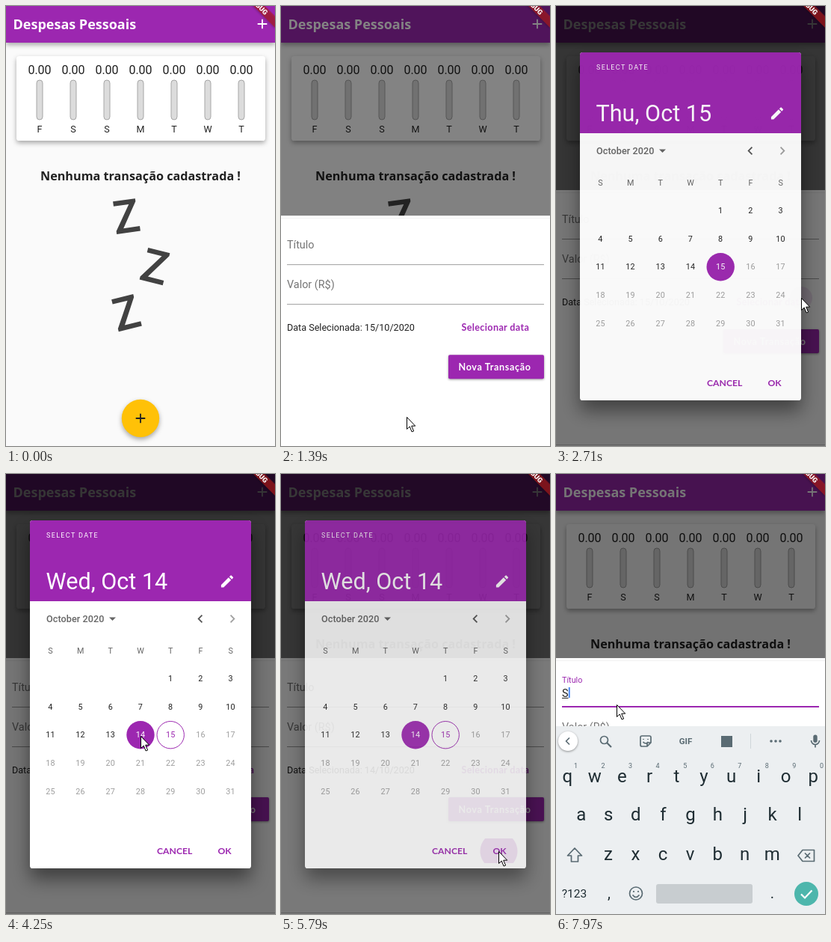
An HTML page for the animation above (8000 ms loop, 360 px wide and 588 px high).

```html
<!DOCTYPE html>
<html lang="pt">
<head>
<meta charset="utf-8">
<title>Despesas Pessoais</title>
<style>
  html, body { margin: 0; width: 100%; height: 100%; overflow: hidden; background: #fafafa; }
  svg { display: block; }
  #stage { width: 100vw; height: 100vh; }
  text { font-family: Roboto, sans-serif; white-space: pre; }
  .title { font-family: "Open Sans", sans-serif; font-weight: 700; }
  .button { font-family: Lato, sans-serif; font-weight: 700; }
  .medium { font-weight: 500; }
  .bold { font-weight: 700; }
  .line { fill: none; stroke: #5a6b73; stroke-width: 1.7; stroke-linejoin: round; }
  .low { filter: drop-shadow(0 1px 1.5px #0006); }
  .mid { filter: drop-shadow(0 3px 3px #0005); }
  .high { filter: drop-shadow(0 14px 12px #0007); }
</style>
</head>
<body>
<svg id="stage" viewBox="0 0 360 588"></svg>
<script>
const LOOP = 8000, PURPLE = '#9c27b0', INK = '#212121', GREY = '#757575';
const stage = document.getElementById('stage');
const $ = id => document.getElementById(id);

const text = (x, y, size, fill, str, attrs = '') =>
  `<text x="${x}" y="${y}" font-size="${size}" fill="${fill}" ${attrs}>${str}</text>`;
const centred = (x, y, size, fill, str, attrs = '') =>
  text(x, y, size, fill, str, `text-anchor="middle" ${attrs}`);
const rect = (x, y, w, h, fill, attrs = '') =>
  `<rect x="${x}" y="${y}" width="${w}" height="${h}" fill="${fill}" ${attrs}/>`;
const circle = (x, y, r, fill, attrs = '') =>
  `<circle cx="${x}" cy="${y}" r="${r}" fill="${fill}" ${attrs}/>`;
const path = (d, attrs = '') => `<path d="${d}" ${attrs}/>`;
const icon = (x, y, d, fill) =>
  path(d, `fill="${fill}" transform="translate(${x} ${y}) scale(.9) translate(-12 -12)"`);
const splash = (id, x, y, fill = PURPLE) => circle(x, y, 0, fill, `id="${id}" opacity=".13"`);

const PLUS = 'M19 13h-6v6h-2v-6H5v-2h6V5h2v6h6v2z';
const PENCIL = 'M3 17.25V21h3.75L17.81 9.94l-3.75-3.75L3 17.25zM20.71 7.04a1 1 0 0 0 0-1.41l-2.34-2.34a1 1 0 0 0-1.41 0l-1.83 1.83 3.75 3.75 1.83-1.83z';
const LEFT = 'M15.41 7.41 14 6l-6 6 6 6 1.41-1.41L10.83 12z';
const RIGHT = 'M10 6 8.59 7.41 13.17 12l-4.58 4.59L10 18l6-6z';
const LETTER_Z = 'M-15-22H15V-18L-6 15.5H16V22H-16V18L5.5-15.5H-15z';

function home() {
  const days = [...'FSSMTWT'].map((day, i) => {
    const x = 45 * (i + 1);
    return centred(x, 91, 16, INK, '0.00')
      + rect(x - 4, 99, 8, 53, '#dcdcdc', 'rx="4" stroke="#a6a6a6"')
      + centred(x, 169, 12.6, INK, day);
  }).join('');
  const sleep = [[161, 281, -8], [199.5, 348, 14], [161, 410, -14]].map(([x, y, turn]) =>
    path(LETTER_Z, `fill="#424242" transform="translate(${x} ${y}) rotate(${turn})"`)).join('');
  return rect(0, 0, 360, 588, '#fafafa')
    + rect(0, -5, 360, 54, PURPLE, 'class="mid"')
    + text(9.5, 31, 18, '#fff', 'Despesas Pessoais', 'class="title"')
    + icon(343, 24, PLUS, '#fff')
    + rect(14, 67, 333, 113, '#fff', 'rx="3.6" class="mid"')
    + days
    + centred(180, 233, 16.2, INK, 'Nenhuma transação cadastrada !', 'class="title"')
    + sleep
    + circle(180, 551, 25.2, '#ffc107', 'class="mid"')
    + splash('fabSplash', 168, 549, '#000')
    + icon(180, 551, PLUS, INK);
}

function sheet() {
  return rect(0, 246, 360, 342, '#fff')
    + rect(0, 249, 360, 1, '#f1f1f1') + rect(0, 586, 360, 1, '#cfcfcf')
    + text(8, 290, 14.4, GREY, 'Título', 'id="label"')
    + rect(8, 311, 344, 1, '#9e9e9e', 'id="underline"')
    + `<g id="typed">${text(8, 297.5, 14.4, INK, 'S')}${rect(8, 299, 8.5, 1, INK)}</g>`
    + rect(8.3, 285, 1.9, 14, '#4285f4', 'id="caret"')
    + text(8, 343, 14.4, GREY, 'Valor (R$)')
    + rect(8, 364, 344, 1, '#9e9e9e')
    + text(8, 400, 12.6, INK, '', 'id="date"')
    + splash('selectSplash', 328, 390)
    + text(241.5, 400, 12.6, PURPLE, 'Selecionar data', 'class="button" letter-spacing=".35"')
    + rect(224, 432, 128, 32, PURPLE, 'rx="2" class="low"')
    + text(237.5, 453, 12.6, '#fff', 'Nova Transação', 'class="button" letter-spacing=".65"');
}

function dialog() {
  const colX = i => 59.4 + 40.2 * i, rowY = i => 273 + 37.7 * i;
  let grid = [...'SMTWTFS'].map((day, i) => centred(colX(i), 240, 10.8, '#666', day)).join('');
  for (let day = 1; day <= 31; day++) {
    const cell = day + 3;
    grid += centred(colX(cell % 7).toFixed(1), (rowY(Math.floor(cell / 7)) + 4).toFixed(1), 10.8,
      day > 15 ? '#9e9e9e' : INK, day, `id="day${day}" letter-spacing=".2"`);
  }
  return rect(32, 62, 296, 465, '#fff', 'rx="3.6" class="high"')
    + path('M32 170V65.6a3.6 3.6 0 0 1 3.6-3.6H324.4a3.6 3.6 0 0 1 3.6 3.6V170z', `fill="${PURPLE}"`)
    + text(54, 85, 9, '#fff', 'SELECT DATE', 'letter-spacing="1.35"')
    + text(53.5, 154, 30.6, '#fff', '', 'id="headline"')
    + icon(296, 143.5, PENCIL, '#fff')
    + text(54, 198, 12.6, '#666', 'October 2020', 'class="medium" letter-spacing=".09"')
    + path('M138 191.5h9l-4.5 4.5z', 'fill="#666"')
    + icon(260, 193.5, LEFT, '#555') + icon(303, 193.5, RIGHT, '#a0a0a0')
    + circle(0, 348.7, 18.7, PURPLE, 'id="selected"')
    + circle(220.2, 348.7, 18.2, 'none', `id="today" stroke="${PURPLE}"`)
    + grid + splash('daySplash', 180, 350)
    + `<svg x="264" y="487" width="56" height="33">${splash('okSplash', 27.5, 17)}</svg>`
    + text(202, 508, 12.2, PURPLE, 'CANCEL', 'class="button"')
    + text(283.5, 508, 12.2, PURPLE, 'OK', 'class="button"');
}

function keyboard() {
  const step = 36.55, ink = '#1f2d33', soft = '#5a6b73';
  const row = (keys, x, y) => [...keys].map((key, i) => centred(x + step * i, y, 24, ink, key)).join('');
  const hints = [...'1234567890'].map((n, i) => centred(26.5 + step * i, 393, 9, soft, n)).join('');
  const line = (d, attrs = '') => path(d, `class="line" ${attrs}`);
  return rect(0, 337, 360, 251, '#eceff1')
    + circle(16, 357, 13, '#fff', 'class="low"') + line('M18 352.5l-4.5 4.5 4.5 4.5')
    + circle(64.5, 355.5, 5, 'none', 'class="line"') + line('M68 359l6 6', 'style="stroke-width:2.2"')
    + line('M115 350h10a2 2 0 0 1 2 2v7l-5 5h-7a2 2 0 0 1-2-2v-10a2 2 0 0 1 2-2zM127 359h-5v5M116.5 358q3.5 4 7 0M117 354v1M123 354v1')
    + centred(173.5, 361, 11.5, soft, 'GIF', 'class="bold"')
    + rect(221, 350, 15, 15, soft) + rect(260, 347, 1, 20, '#cfd6d9')
    + [288, 294, 300].map(x => circle(x, 357, 1.8, soft)).join('')
    + rect(344.3, 348.5, 5.4, 10.5, soft, 'rx="2.7"') + line('M341.5 356a5.5 5.5 0 0 0 11 0M347 361.5v4')
    + hints
    + row('qwertyuiop', 15.3, 412) + row('asdfghjkl', 33.7, 463) + row('zxcvbnm', 70, 516)
    + line('M25 500l-9.5 10h5v8h9v-8h5z')
    + line('M330 502.500h15.500v15h-15.500l-6-7.500zM333 506.500l7 7M340 506.500l-7 7')
    + centred(24.500, 566, 15.500, ink, '?123') + centred(71, 567, 20, ink, ',') + centred(289.500, 567, 20, ink, '.')
    + circle(107, 560.500, 8.500, 'none', 'class="line"') + line('M102.500 562.500q4.500 6 9 0M104 557v2M110 557v2')
    + rect(134, 548, 129, 26, '#c8cdd0', 'rx="3"')
    + circle(335, 561, 16, '#4db6ac') + path('M328 561.500l5 5 9.500-10', 'fill="none" stroke="#fff" stroke-width="2.2"');
}

stage.innerHTML = home()
  + rect(0, 0, 360, 588, '#000', 'id="sheetShade"')
  + `<g id="sheet">${sheet()}</g><g id="keyboard">${keyboard()}</g>`
  + rect(0, 0, 360, 588, '#000', 'id="dialogShade"')
  + `<g id="dialog">${dialog()}</g>`
  + `<g transform="translate(360 -22) rotate(45)">${rect(-36, 25.2, 72, 10.8, '#b71c1c', 'fill-opacity=".63" class="low"')}`
  + centred(0, 33.900, 9.200, '#fff', 'DEBUG', 'style="font-weight:900"') + '</g>'
  + path('M.5.5v16l3.700-3.500 2.900 7 2.500-1-2.900-6.800h5z', 'id="pointer" fill="#fff" stroke="#000"');

// time, x, y
const POINTER = [
  [380, 137, 580], [700, 160, 560], [930, 172, 551], [1080, 168, 549],
  [1640, 168, 549], [2010, 329, 390], [2200, 329, 390], [2240, 328, 390],
  [2710, 328, 390], [3490, 201, 357], [3580, 201, 357], [4020, 180, 350],
  [4260, 180, 350], [4950, 288, 531], [5110, 288, 531], [5560, 291, 504],
  [5870, 291, 504], [5950, 275, 508], [6410, 80, 309], [6500, 80, 309],
  [6720, 81, 306], [7200, 81, 306], [7300, 81, 308]];
const DIALOG = [[2700, 0], [2700, .95], [2780, 1], [5750, 1], [5790, .85], [5940, 0]];
// id, start, end, largest radius
const SPLASHES = [
  ['fabSplash', 1040, 1470, 17], ['selectSplash', 2380, 2780, 15],
  ['daySplash', 4060, 4250, 15], ['okSplash', 5600, 5950, 25]];

const clamp = v => Math.min(1, Math.max(0, v));
const linear = p => p;
const smooth = p => p * p * (3 - 2 * p);
const decelerate = p => 1 - (1 - p) ** 2;
const progress = (t, start, length) => decelerate(clamp((t - start) / length));
const mix = (a, b, p) => a + (b - a) * p;

function along(track, t, ease) {
  const next = track.findIndex(key => key[0] > t);
  if (next < 1) return track[next < 0 ? track.length - 1 : 0].slice(1);
  const a = track[next - 1], b = track[next];
  const p = ease((t - a[0]) / (b[0] - a[0]));
  return a.slice(1).map((v, i) => mix(v, b[i + 1], p));
}

function set(id, attrs) {
  for (const name in attrs) $(id).setAttribute(name, attrs[name]);
}
const show = (id, on) => set(id, { visibility: on ? 'visible' : 'hidden' });

function render(t) {
  const [x, y] = along(POINTER, t, smooth);
  set('pointer', { transform: `translate(${x} ${y})` });
  show('pointer', t >= 380);

  const open = progress(t, 1220, 250);
  set('sheet', { transform: `translate(0 ${342 * (1 - open)})` });
  set('sheetShade', { opacity: .54 * open });

  const [alpha] = along(DIALOG, t, linear);
  set('dialog', { opacity: alpha });
  set('dialogShade', { opacity: .54 * decelerate(alpha) });

  const changed = t >= 4250;
  $('headline').textContent = changed ? 'Wed, Oct 14' : 'Thu, Oct 15';
  set('selected', { cx: changed ? 180 : 220.2 });
  show('today', changed);
  set('day14', { fill: changed ? '#fff' : INK });
  set('day15', { fill: changed ? PURPLE : '#fff' });
  $('date').textContent = `Data Selecionada: ${t < 5780 ? 15 : 14}/10/2020`;

  for (const [id, start, end, radius] of SPLASHES) {
    const p = clamp((t - start) / 190);
    set(id, { r: t >= start && t < end ? mix(3, radius, p) : 0 });
  }

  const focus = progress(t, 6880, 180), focused = t >= 6900, typed = t >= 7970;
  set('label', {
    y: mix(290, 279, focus), 'font-size': mix(14.4, 10.8, focus), fill: focused ? PURPLE : GREY
  });
  set('underline', { y: focused ? 310 : 311, height: focused ? 2 : 1, fill: focused ? PURPLE : '#9e9e9e' });
  show('typed', typed);
  set('caret', { x: typed ? 16.8 : 8.3 });
  show('caret', t >= 6860 && t < 7340 || t >= 7800);
  set('keyboard', { transform: `translate(0 ${251 * (1 - progress(t, 6920, 190))})` });
}

const began = performance.now();
(function tick() {
  render((performance.now() - began) % LOOP);
  requestAnimationFrame(tick);
})();
</script>
</body>
</html>
```
